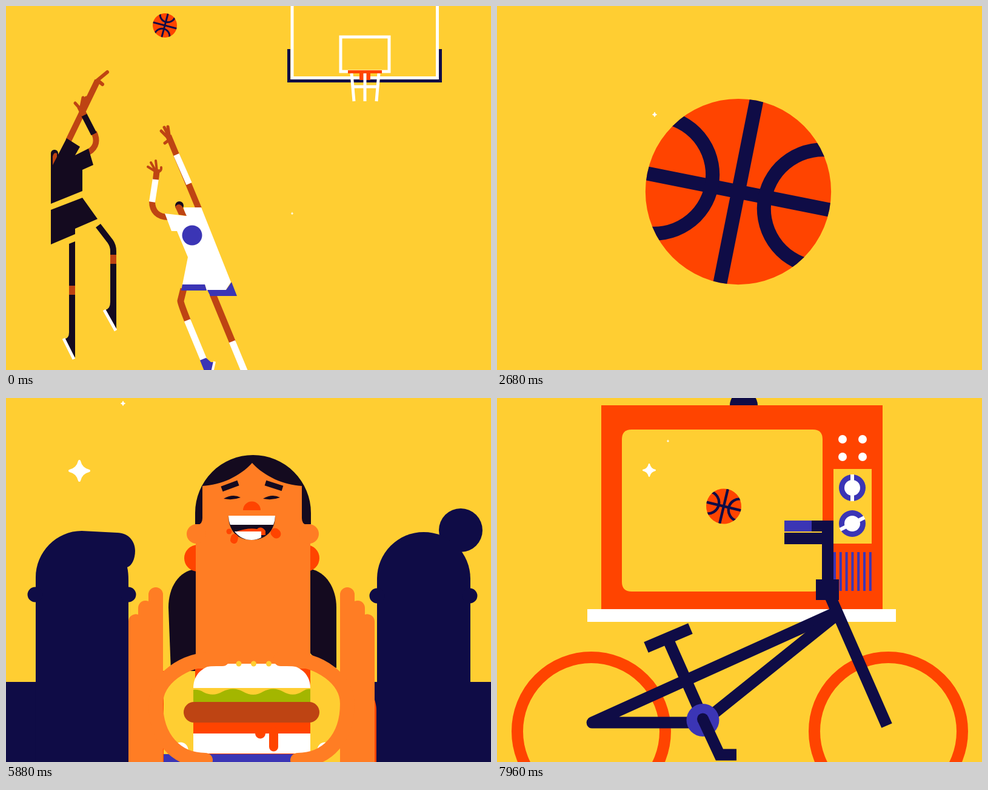
An HTML page with a canvas for the animation above (8000 ms loop, 800 by 600 pixels).

```html
<!DOCTYPE html>
<html lang="en">
<head>
<meta charset="utf-8">
<title>Game night</title>
<style>
html, body { margin: 0; height: 100%; overflow: hidden; background: #ffce32; }
canvas { display: block; width: 100vw; height: 100vh; }
</style>
</head>
<body>
<canvas id="stage" width="800" height="600"></canvas>
<script>
const c = document.getElementById('stage').getContext('2d');
const YELLOW = '#ffce32', RED = '#ff4400', NAVY = '#0f0c46', DARK = '#140a1f', BROWN = '#be4413',
  BLUE = '#3b35b5', SKIN = '#ff7d24', GREEN = '#a3b600', WHITE = '#fff';
const LOOP = 8000;
let k = 0; // blend between the two poses of a path

// Both poses must use the same path commands, without arcs.
function pose(a, b) {
  if (!b) return new Path2D(a);
  const number = /-?\d+(\.\d+)?/g, goal = b.match(number);
  let i = 0;
  return new Path2D(a.replace(number, v => (+v + (goal[i++] - v) * k).toFixed(2)));
}
function fill(color, a, b) {
  c.fillStyle = color;
  c.fill(pose(a, b));
}
function line(color, width, a, b, cap = 'butt') {
  c.strokeStyle = color;
  c.lineWidth = width;
  c.lineCap = cap;
  c.lineJoin = cap === 'round' ? 'round' : 'miter';
  c.stroke(pose(a, b));
}
const round = (color, width, a, b) => line(color, width, a, b, 'round');
function rect(color, x, y, right, bottom) {
  c.fillStyle = color;
  c.fillRect(x, y, right - x, bottom - y);
}
function oval(color, x, y, rx, ry = rx) {
  c.fillStyle = color;
  c.beginPath();
  c.ellipse(x, y, rx, ry, 0, 0, 7);
  c.fill();
}
function shifted(x, y, draw) {
  c.save();
  c.translate(x, y);
  draw();
  c.restore();
}

function star(t, x, y, start, life = 700) {
  const p = (t - start) / life;
  if (p <= 0 || p >= 1) return;
  shifted(x, y, () => {
    const r = Math.sin(Math.PI * p);
    c.scale(r, r);
    const d = 'M0 -16Q3 -3 16 0Q3 3 0 16Q-3 3 -16 0Q-3 -3 0 -16Z';
    fill(WHITE, d);
    round(WHITE, 4, d);
  });
}

function ball(x, y, r, degrees) {
  shifted(x, y, () => {
    c.rotate(degrees * Math.PI / 180);
    c.scale(r / 153, r / 153);
    oval(RED, 0, 0, 153);
    c.clip();
    line(NAVY, 23, 'M-160 0H160M0 -160V160');
    for (const side of [-142, 142]) {
      c.beginPath();
      c.arc(side, 0, 97, 0, 7);
      c.stroke();
    }
  });
}

function hoop() {
  line(NAVY, 5, 'M466.5 71V123.5H716.5V71');
  line(WHITE, 5, 'M472 -5V118.5H711.5V-5M552 51H632V108H552Z');
  rect(RED, 583, 108, 601, 122);
  line(WHITE, 5, 'M570 111L574 157M592 111V157M615 111L611 157M571 133H613');
  rect(RED, 564, 106, 620, 111);
}

function shooter() {
  fill(DARK, 'M74 270V243C74 235 86 235 86 243V260Z', 'M52 267V242C52 234 64 234 64 242V258Z');
  fill(BROWN, 'M77 264V248Q79 240 84 243V262Z', 'M55 264V247Q57 239 62 242V262Z');
  line(BROWN, 10, 'M103 222L151 123', 'M85 222L138 126');
  round(BROWN, 6, 'M150 123L167 109M153 124L159 129', 'M138 126L159 121M140 128L145 135');
  line(BROWN, 10, 'M145 208C151 220 150 233 136 241', 'M130 217C137 231 132 245 119 248');
  line(DARK, 10, 'M128 178L145 211', 'M116 181L131 219');
  line(BROWN, 10, 'M129 180L122 166', 'M117 183L112 172');
  round(BROWN, 5, 'M122 169L114 160M124 166L127 151M128 167L132 151',
    'M112 175L106 168M114 171L117 156M115 172L118 158');
  fill(DARK, 'M100 218L122 232L114 246L136 235L144 262L126 270L126 305L74 326L74 268Z',
    'M82 218L103 233L94 249L120 243L122 271L104 275L105 304L53 325L52 265Z');
  fill(DARK, 'M126 316L151 351L114 367L114 376L74 393L74 336Z',
    'M105 314L130 351L97 364L97 374L57 392L53 335Z');

  fill(DARK, 'M104 392L114 388L114 540L114 580L95 549Q104 549 104 538Z',
    'M87 390L97 385L107 540L114 575L91 547Q97 545 97 535Z');
  fill(BROWN, 'M104 461L114 461L114 476L104 476Z', 'M92 459L102 457L103 471L93 473Z');
  line(WHITE, 5, 'M95 548L112 582', 'M90 546L114 576');
  line(DARK, 10, 'M152 362L172 388Q177 395 177 404L177 500', 'M131 361L150 386Q154 393 154 402L153 500');
  fill(DARK, 'M172 488Q172 500 163 501L182 533L182 488Z', 'M148 486Q148 500 141 502L165 530L158 488Z');
  line(BROWN, 10, 'M177 410V425', 'M154 409V424');
  line(WHITE, 5, 'M162 501L181 535', 'M140 502L165 531');
}

function defender() {
  line(BROWN, 11, 'M293 466L288 486Q288 490 300 520', 'M277 460L273 479Q272 486 287 516');
  line(WHITE, 11, 'M299 518L326 583', 'M286 514L315 576');
  fill(BLUE, 'M320 584L330 580L338 587H344L340 604H328Z', 'M309 576L320 573L326 580H333L327 604H319Z');
  line(WHITE, 4, 'M344 586L340 604', 'M332 580L327 604');
  line(BROWN, 11, 'M341 475L374 555', 'M323 468L355 548');
  line(WHITE, 11, 'M373 553L395 606', 'M353 546L378 606');

  line(BROWN, 10, 'M318 334L268 214', 'M302 328L264 203');
  line(WHITE, 10, 'M281 245L302 293', 'M273 235L289 286');
  round(BROWN, 5, 'M270 219L267 199M268 218L256 206M269 216L261 200M270 220L262 226',
    'M264 207L262 187M263 207L254 191M265 207L268 190M263 206L251 211');
  line(BROWN, 10, 'M241 322C241 338 250 348 268 348', 'M226 319C225 337 236 346 250 346');
  line(WHITE, 10, 'M247 284L241 323', 'M232 282L225 320');
  line(BROWN, 10, 'M247 286L249 269', 'M233 283L236 268');
  round(BROWN, 4, 'M247 273L234 265M247 272L239 258M249 272L247 255M250 274Q257 272 256 266',
    'M234 272L220 264M235 271L225 256M236 270L233 252M238 272Q243 270 242 264');

  fill(WHITE, 'M262 342L296 346L293 332L322 332L371 455L362 469L331 469L328 459L291 459L300 414L282 371L273 371Z',
    'M243 342L279 338L277 324L306 326L353 448L344 461L313 462L309 451L274 454L281 408L266 367L256 368Z');
  fill(BLUE, 'M291 459L328 459L331 469L289 469Z', 'M275 453L309 451L314 462L272 464Z');
  fill(BLUE, 'M332 468L363 468L372 455L381 478L337 478Z', 'M314 462L344 461L353 448L362 471L319 471Z');
  round(DARK, 14, 'M286 329h0', 'M271 320h0');
  fill(BROWN, 'M279 331Q285 323 291 331L298 346L285 344Z', 'M264 322Q270 314 277 322L282 338L269 338Z');
  round(BLUE, 33, 'M307 378h0', 'M288 372h0');
}

function gameScene(t) {
  k = t / 1520;
  star(t, 472, 342, -25);
  star(t, 193, 336, 1495);
  star(t, 680, 525, 1360);
  shifted(-11 * k, 0, hoop);
  shooter();
  defender();
  ball(262 + 24 * k, 32 - 22 * k, 20, 105 - 55 * k);
}

function ballScene(t) {
  const r = 153 * Math.exp((t - 2680) * 0.00099), grow = (r - 153) / 88;
  ball(398 - 9 * grow, 306 + 22 * grow, r, 11.3);
  star(t, 260, 179, 2630);
}

function fanHands(bob) {
  shifted(0, bob, () => {
    fill(NAVY, 'M54 620V462L68 334L97 328L112 332L134 355L122 448L121 620Z');
    round(NAVY, 18, 'M77 334h0M97 329h0M112 339h0M125 355h0M36 400L62 435');
  });
  shifted(0, -bob, () => {
    fill(NAVY, 'M176 620L181 325L188 277L243 284V328L238 620Z');
    round(NAVY, 17, 'M198 239L190 310M244 231L236 300M267 298L236 322');
  });
  shifted(0, bob, () => {
    rect(NAVY, 556, 276, 641, 289);
    rect(NAVY, 564, 285, 632, 620);
    line(NAVY, 8, 'M601 280V250Q601 225 575 225H561');
    round(NAVY, 18, 'M556 343V387M620 337H647M620 355H653M620 373H647M620 391H641');
  });
  shifted(0, -bob, () => {
    fill(NAVY, 'M714 620L719 360L725 318L740 320L787 327L782 440L781 620Z');
    round(NAVY, 18, 'M733 259L729 325M697 341L724 371M746 327h0M762 328h0M778 329h0');
  });
}

function fan() {
  fill(YELLOW, 'M90 620V586C90 530 135 486 190 486H636C691 486 736 530 736 586V620Z');
  rect(RED, 486, 573, 604, 600);
  fill(DARK, 'M311 216V178A103.5 103.5 0 0 1 518 178V216Z');
  fill(BROWN, 'M321 216V134A103.5 103.5 0 0 1 352 96H477A103.5 103.5 0 0 1 498 117V216H518V486H311V216Z');
  oval(BROWN, 313.5, 233, 17);
  oval(BROWN, 515.5, 233, 17);
  rect(DARK, 353, 107, 395, 126);
  rect(DARK, 417, 107, 458, 126);
  oval(DARK, 371, 140, 12, 8.5);
  oval(DARK, 436, 140, 12, 8.5);
  fill(RED, 'M387 168A15.5 15.5 0 0 1 418 168Z');
  fill(DARK, 'M363 183H452C452 208 432 227 407.5 227S363 208 363 183Z');
  fill(WHITE, 'M363 183H452Q451 196 446 206H369Q364 196 363 183Z');
}

function drink(t) {
  line(WHITE, 14, 'M278 486V402C278 375 292 360 318 360H374');
  rect(WHITE, 241, 482, 309, 500);
  rect(WHITE, 179, 497, 377, 521);
  rect(RED, 188, 521, 366, 600);
  fill(BROWN, 'M126 600C140 572 165 560 190 560H327a12 12 0 0 1 0 24H188V595H345Q353 595 355 600Z');
  const p = (t - 3480) % 800 / 800;
  if (p > 0.3) shifted(0, 180 * (p * p - 0.25), () =>
    fill(YELLOW, 'M373.5 379Q375 385 382 390A11.3 11.3 0 1 1 365 390Q372 385 373.5 379Z'));
}

function fanScene(t) {
  const bob = 8 * Math.sin((t - 4680) * Math.PI / 720);
  star(t, 655, 80, 4534);
  shifted((4680 - t) / 60, 0, () => {
    rect(NAVY, -60, 487, 860, 600);
    fanHands(bob);
    fan();
  });
  drink(t);
}

function crowd(pan, bob) {
  rect(NAVY, 0, 468, 800, 600);
  shifted(-12 * pan, 0, () => {
    fill(NAVY, 'M49 600V296C49 254 83 219 125 219L183 222C202 222 213 236 213 252C213 266 207 277 200 279Q202 288 202 300V600Z',
      'M49 600V285C49 250 74 214 112 209L189 199C207 199 218 213 218 229C218 246 207 257 195 258Q202 270 202 285V600Z');
    round(NAVY, 25, 'M48 324h0M202 324h0', 'M49 313h0M202 313h0');
    round(NAVY, 72, 'M750 218h0', 'M745 190h0');
  });
  shifted(-12 * pan, -22 * bob, () => {
    fill(NAVY, 'M612 640V298A76.5 76.5 0 0 1 766 298V640Z');
    round(NAVY, 25, 'M612 326h0M765 326h0');
  });
}

function head() {
  fill(DARK, 'M312 208V189.5A95.5 95.5 0 0 1 503 189.5V208Z');
  rect(SKIN, 313, 208, 502, 446);
  oval(SKIN, 314, 224, 16);
  oval(SKIN, 500, 224, 16);
}

function face(eyesOpen) {
  fill(SKIN, 'M316 209Q324 208 324 198V145C355 143 385 130 406 107C427 130 458 143 488 145V198Q488 208 496 209Z');
  line(DARK, 9, 'M356 150L383 140M428 140L456 149');
  for (const x of [374, 439]) {
    if (eyesOpen) oval(DARK, x, 161, 11.5);
    else fill(DARK, `M${x - 15} 166Q${x} 157 ${x + 13} 164Q${x} 169 ${x - 15} 166Z`);
  }
  fill(RED, 'M391 185A14.5 14.5 0 0 1 420 185Z');
  fill(DARK, 'M367 194H444C444 219 428 234 405 234S367 219 367 194Z');
  fill(WHITE, 'M367 194H444Q444 202 441 209H370Q367 202 367 194Z');
  fill(RED, 'M377 221Q400 213 414 216Q421 210 428 219V226H420V221Z',
    'M377 226Q400 217 414 220Q423 216 428 225V227H420V226Z');
  fill(WHITE, 'M377 220H421V230Q413 234 405 234Q388 234 377 220Z',
    'M380 225H421V230Q413 234 405 234Q388 234 380 225Z');
}

function burger() {
  fill(WHITE, 'M309 478C309 453 328 438 360 438H450C482 438 502 453 502 478Z');
  rect(YELLOW, 309, 478, 502, 500);
  fill(GREEN, 'M309 501V481Q318 480 326 485Q342 493 357 484Q375 475 391 484Q408 494 424 484Q441 475 457 484Q474 494 490 483Q496 479 502 480V501Z');
  rect(RED, 309, 535, 502, 553);
  rect(WHITE, 309, 553, 502, 586);
  fill(RED, 'M411 553a8.5 8.5 0 0 0 17 0Z');
  round(RED, 15, 'M441.5 550V575');
  round(BROWN, 34, 'M310 518H500');
  round(YELLOW, 9, 'M384 438h0M408.5 438h0M433.5 438h0');
}

function hand() {
  fill(SKIN, 'M202 640V368a12 12 0 0 1 16 -11V346a12 12 0 0 1 17 -11V324a12 12 0 0 1 24 0V640Z');
  round(SKIN, 24, 'M357 430H347C292 430 247 464 247 504C247 560 280 597 329 597');
}

function girlScene(t) {
  const pan = (t - 5880) / 720, bob = (1 - Math.cos(Math.PI * pan)) / 2;
  k = bob;
  star(t, 121, 120, 5530);
  star(t, 193, 9, 5830);
  star(t, 580, 87, 6550);
  crowd(pan, bob);
  shifted(-12.5 * pan, 14.5 * bob, () => {
    fill(RED, 'M204 640V515C204 490 225 446 290 446H525C590 446 611 490 611 515V640Z');
    rect(YELLOW, 260, 440, 553, 640);
  });
  shifted(-12.5 * pan, 0, () => {
    fill(DARK, 'M313 282C285 285 268 312 268 345L272 450C290 450 313 450 313 450Z',
      'M313 291C278 291 259 320 259 350L269 455C293 453 312 430 312 405Z');
    fill(DARK, 'M502 282C528 286 545 314 545 345L545 445C530 440 502 425 502 420Z',
      'M502 291C528 295 543 318 545 345L557 451C528 450 502 430 502 415Z');
    round(RED, 44, 'M316 264h0M495 264h0', 'M312 274h0M489 274h0');
  });
  shifted(-12.5 * pan, 14.5 * bob, () => {
    rect(RED, 312, 445, 502, 640);
    head();
  });
  shifted(-10.5 * pan, 12.8 * bob, () => face(bob > 0.3));
  shifted(-12.5 * pan, 0, () => {
    round(RED, 9, 'M368 220h0', 'M364 241h0');
    round(RED, 12, 'M377 230L376 234', 'M375 254L374 257');
    round(RED, 15, 'M444 222L446 224', 'M454 243L456 245');
  });
  fill(BLUE, 'M260 587H500V640H260Z', 'M299 574H306V640H299Z');
  round(WHITE, 25, 'M288 580h0M526 580h0', 'M275 597h0M515 597h0');
  shifted(-2 * pan, 41 * bob, () => {
    burger();
    hand();
    c.translate(810, 0);
    c.scale(-1, 1);
    hand();
  });
}

function television(t) {
  oval(NAVY, 407, 12, 23);
  rect(RED, 172, 12, 636, 349);
  fill(YELLOW, 'M222 52H521Q537 52 537 68V303Q537 319 521 319H222Q206 319 206 303V68Q206 52 222 52Z');
  star(t, 251, 119, 7814);
  star(t, 282, 71, 7935);
  ball(374, 178.5, 29 * Math.exp((t - 7960) * 0.00099), 13.5);
  round(WHITE, 14, 'M570 68h0M603 68h0M570 97h0M603 97h0');
  rect(YELLOW, 555, 117, 618, 240);
  for (const y of [148, 207]) {
    oval(BLUE, 586, y, 22);
    oval(WHITE, 586, y, 13);
  }
  line(WHITE, 6, 'M586 126V170M566 217L606 197');
  for (let i = 0; i < 7; i++) rect(BLUE, 555 + i * 9.8, 254, 559 + i * 9.8, 318);
  rect(WHITE, 149, 348, 658, 369);
}

function bike() {
  c.strokeStyle = RED;
  c.lineWidth = 19;
  for (const x of [155.5, 645.5]) {
    c.beginPath();
    c.arc(x, 549.5, 122, 0, 7);
    c.stroke();
  }
  round(NAVY, 19, 'M558 354L157 535H330');
  line(NAVY, 19, 'M562 356L345 530M282 398L337 522M246 411L319 380M550 328L643 540');
  rect(NAVY, 526, 299, 564, 333);
  rect(NAVY, 536, 202, 555, 300);
  rect(NAVY, 474, 202, 555, 220);
  rect(BLUE, 474, 202, 519, 220);
  rect(NAVY, 474, 222, 555, 241);
  oval(BLUE, 339.5, 531, 27);
  oval(NAVY, 339.5, 529, 9.5);
  line(NAVY, 19, 'M339.5 529L367 588H395');
}

function roomScene(t) {
  const zoom = 1 + (7960 - t) * 1e-5;
  shifted(400, 300, () => {
    c.scale(zoom, zoom);
    c.translate(-400, -300);
    television(t);
    bike();
  });
}

const scenes = [[7160, roomScene], [5320, girlScene], [3520, fanScene], [1840, ballScene], [0, gameScene]];

function draw() {
  const t = performance.now() % LOOP;
  rect(YELLOW, 0, 0, 800, 600);
  scenes.find(([start]) => t >= start)[1](t);
  requestAnimationFrame(draw);
}
draw();
</script>
</body>
</html>
```
